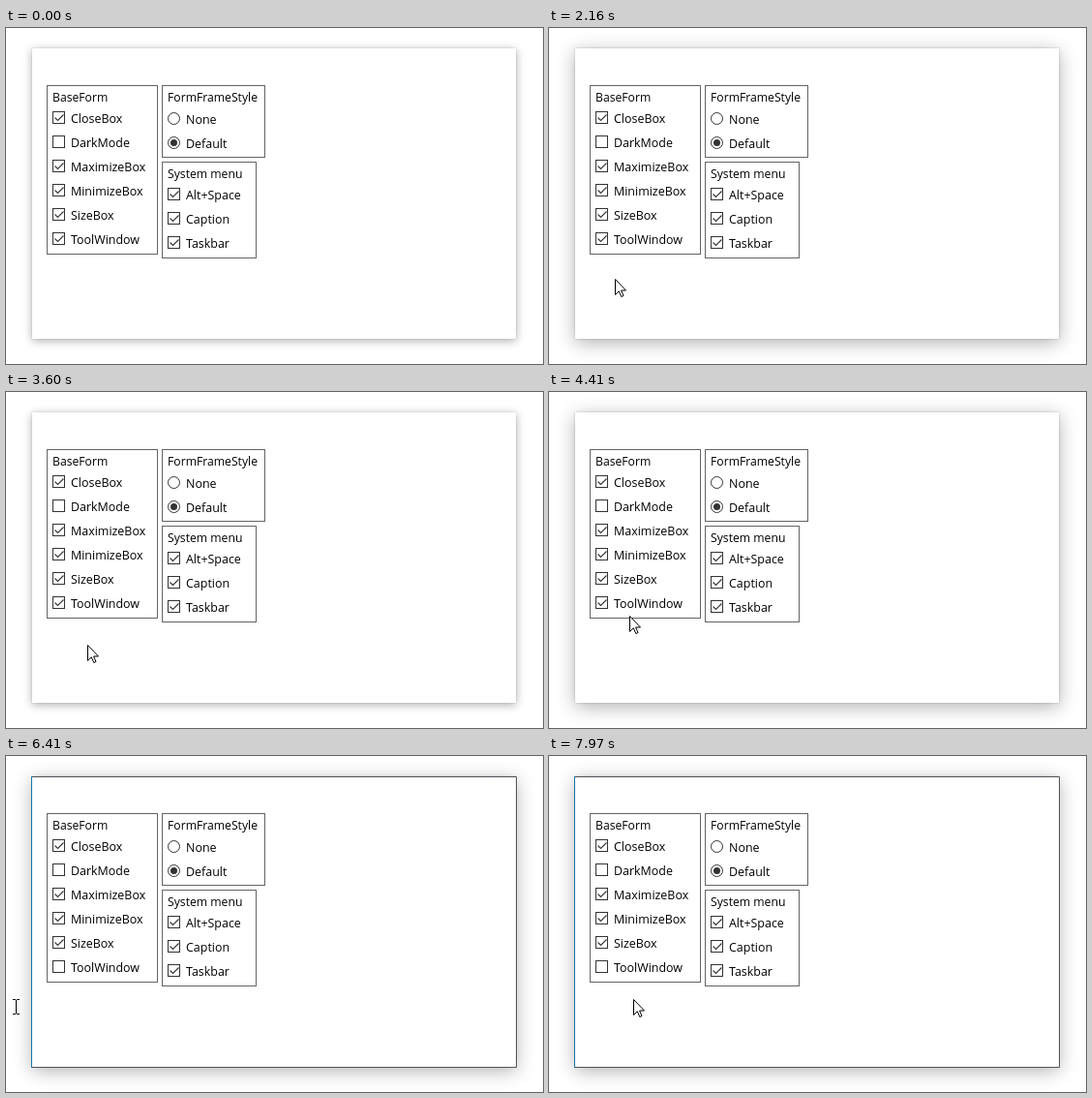
Recreate the animation shown at these times as an HTML page. Size 555 by 347 pixels, loop 8000 ms.

```html
<!DOCTYPE html>
<html lang="en">
<head>
<meta charset="utf-8">
<title>Window options</title>
<style>
  html, body { margin: 0; width: 100%; height: 100%; overflow: hidden; background: #fff; }
  .win { position: absolute; left: 27px; top: 21px; width: 500px; height: 300px; background: #fff; }
  #idle { box-shadow: 0 2px 9px rgba(0, 0, 0, .33), 0 0 1px rgba(0, 0, 0, .25); }
  #focus { box-shadow: 0 4px 18px rgba(0, 0, 0, .31), 0 0 2px rgba(0, 0, 0, .22); }
  svg { position: absolute; left: 0; top: 0; display: block; }
  text { font: 12.45px "Open Sans", "Noto Sans", sans-serif; fill: #000; }
  .title { font-size: 12.2px; }
  .line { fill: none; stroke: #646464; }
  .box { fill: #fff; stroke: #333; }
  .box.hover { stroke: #0078d7; }
  .tick { fill: none; stroke: #333; stroke-width: 1.1; }
</style>
</head>
<body>
<div class="win" id="idle"></div>
<div class="win" id="focus"></div>
<svg id="stage" width="555" height="347" viewBox="0 0 555 347">
  <g id="frame" fill="none">
    <rect x="26.5" y="21.5" width="501" height="300" stroke="#aaa"/>
    <g id="accent">
      <path d="M26 21.5H527.5V321.5H26" stroke="#50565c"/>
      <path d="M26.5 21V322" stroke="#1673ab"/>
    </g>
  </g>
  <g id="form"></g>
  <path id="arrow" d="M.5 .5V16.5L4.3 12.8L6.8 18.5L9 17.5L6.6 12H11.5Z" fill="#fff" stroke="#000"/>
  <path id="beam" d="M-3 -7.5H0M1 -7.5H4M.5 -7V7M-3 7.5H0M1 7.5H4" fill="none" stroke="#000"/>
</svg>
<script>
const LOOP = 8000, STEP = 70;
const $ = id => document.getElementById(id);
const show = (el, on) => { el.style.display = on ? '' : 'none'; };

function add(tag, attrs, content = '') {
  const el = document.createElementNS('http://www.w3.org/2000/svg', tag);
  for (const key in attrs) el.setAttribute(key, attrs[key]);
  el.textContent = content;
  return $('form').appendChild(el);
}

function group(x, y, width, height, title) {
  add('rect', { class: 'line', x: x + .5, y: y + .5, width: width - 1, height: height - 1 });
  add('text', { class: 'title', x: x + 6, y: y + 17 }, title);
}

function check(x, y, name, on) {
  const box = add('rect', { class: 'box', x: x + .5, y: y + .5, width: 12, height: 12 });
  const tick = add('path', { class: 'tick', d: `M${x + 2.5} ${y + 6.5}l3 3l6 -6` });
  show(tick, on);
  add('text', { x: x + 19, y: y + 12 }, name);
  return { box, tick };
}

function radio(x, y, name, on) {
  add('circle', { class: 'box', cx: x, cy: y, r: 6 });
  if (on) add('circle', { cx: x, cy: y, r: 3.5, fill: '#333' });
  add('text', { x: x + 12.5, y: y + 5.5 }, name);
}

group(42, 59, 115, 175, 'BaseForm');
const checks = ['CloseBox', 'DarkMode', 'MaximizeBox', 'MinimizeBox', 'SizeBox', 'ToolWindow']
  .map((name, i) => check(48, 86 + 25 * i, name, name !== 'DarkMode'));
const tool = checks[5];

group(161, 59, 107, 75, 'FormFrameStyle');
['None', 'Default'].forEach((name, i) => radio(173.5, 93.5 + 25 * i, name, i === 1));

group(161, 138, 98, 100, 'System menu');
['Alt+Space', 'Caption', 'Taskbar'].forEach((name, i) => check(167, 165 + 25 * i, name, true));

// Each glide runs from the previous rest point: first step, last step, x, y
const origin = { x: 228, y: 360 };
const glides = [
  [730, 1220, 84, 263],
  [2160, 2700, 7, 246],
  [3260, 3600, 84, 261],
  [4130, 4410, 83, 231],
  [4480, 4750, 83, 220],
  [5300, 5300, 83, 227],
  [5370, 6070, 34, 260],
  [6150, 6410, 10, 259],
  [6950, 7370, 87, 257],
  [7970, 7970, 87, 251]
].map(([start, end, x, y]) => ({ start, end, x, y }));

// Every click toggles the window focus
const clicks = [1440, 3120, 3930, 6680, 7570];
const UNCHECK = 4900;

function pointer(t) {
  const i = glides.findLastIndex(g => g.start <= t);
  if (i < 0) return null;
  const to = glides[i], from = glides[i - 1] || origin;
  let u = 1;
  if (t < to.end) {
    const steps = Math.round((to.end - to.start) / STEP);
    const done = Math.floor((t - to.start) / (to.end - to.start) * steps + 1e-6);
    u = 1 - (1 - (done + 1) / (steps + 1)) ** 2;
  }
  const mix = key => Math.round(from[key] + (to[key] - from[key]) * u);
  return { x: mix('x'), y: mix('y') };
}

function focusLevel(t) {
  const i = clicks.findLastIndex(c => c <= t);
  if (i < 0) return 0;
  if (t - clicks[i] < 60) return .5;
  return i % 2 ? 0 : 1;
}

function draw(t) {
  const level = focusLevel(t);
  $('idle').style.opacity = 1 - level;
  $('focus').style.opacity = level;
  $('accent').style.opacity = level;
  show($('frame'), t >= UNCHECK + STEP);
  show(tool.tick, t < UNCHECK);

  const pos = pointer(t);
  const inside = !!pos && pos.x >= 27;
  show($('arrow'), inside);
  show($('beam'), pos && !inside);
  if (pos) $(inside ? 'arrow' : 'beam').setAttribute('transform', `translate(${pos.x},${pos.y})`);
  tool.box.classList.toggle('hover', inside && pos.y < 229);
}

function run() {
  draw(performance.now() % LOOP);
  requestAnimationFrame(run);
}
run();
</script>
</body>
</html>
```
